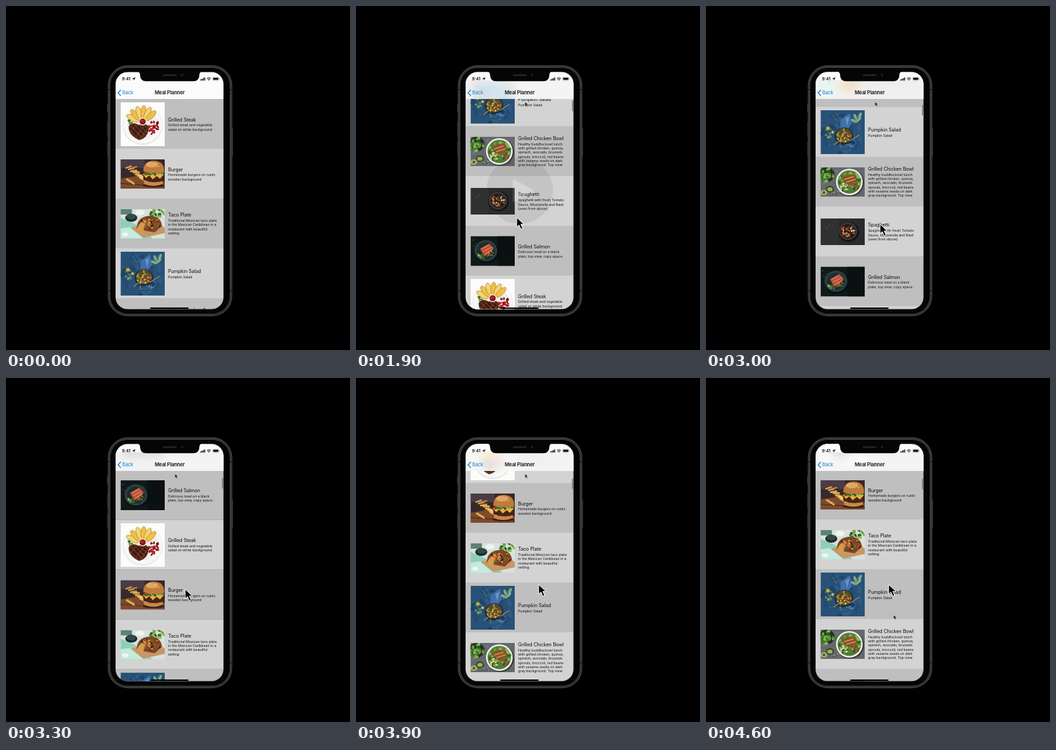
Animation, 518 px wide and 518 px high, one loop 4700 ms. Source, as an HTML page:

```html
<!DOCTYPE html>
<html lang="en">
<head>
<meta charset="utf-8">
<title>Meal Planner</title>
<style>
  html, body { margin: 0; width: 100%; height: 100%; overflow: hidden; background: #000; }
  svg { display: block; width: 100vw; height: 100vh; }
  text { font-family: Inter, "Open Sans", sans-serif; fill: #111; }
  .title { font-size: 7.3px; letter-spacing: -.12px; }
  .note { font-size: 5.2px; }
  .bar { font-size: 7.4px; letter-spacing: -.12px; }
</style>
</head>
<body>
<svg id="stage" viewBox="0 0 518 518"></svg>
<script>
const ROW = 75, LIST_TOP = 140, LOOP = 4700, STEP = 100;

// Drawing helpers
const rect = (x, y, w, h, fill, extra = '') =>
  `<rect x="${x}" y="${y}" width="${w}" height="${h}" fill="${fill}" ${extra}/>`;
const oval = (x, y, rx, ry, fill, extra = '') =>
  `<ellipse cx="${x}" cy="${y}" rx="${rx}" ry="${ry}" fill="${fill}" ${extra}/>`;
const path = (d, fill, extra = '') => `<path d="${d}" fill="${fill}" ${extra}/>`;
const line = (d, color, width) =>
  path(d, 'none', `stroke="${color}" stroke-width="${width}" stroke-linecap="round"`);

function bits(count, cx, cy, rx, ry, size, colors, seed) {
  const random = () => (seed = (seed * 16807) % 2147483647) / 2147483647;
  for (let i = 0; i < 5; i++) random();
  let out = '';
  for (let i = 0; i < count; i++) {
    const angle = random() * 2 * Math.PI, r = Math.sqrt(random());
    const x = cx + rx * r * Math.cos(angle), y = cy + ry * r * Math.sin(angle);
    out += oval(x.toFixed(1), y.toFixed(1), size * (.7 + random() * .6), size * .6,
      colors[i % colors.length],
      `transform="rotate(${Math.floor(random() * 180)} ${x.toFixed(1)} ${y.toFixed(1)})"`);
  }
  return out;
}

const greens = ['#3f7a2c', '#6ca63f', '#2c5823', '#8dbb55'];

function steakPhoto() {
  return rect(0, 0, 66, 66, '#fcfcfa') + oval(33, 34, 30, 30, '#e6e6e4') +
    oval(33, 33, 29, 29, '#f8f8f6') + oval(33, 33, 23, 23, '#efeeeb') +
    [-62, -40, -18, 4, 26, 46].map((a, i) =>
      oval(33, 15, 4, 10, i % 2 ? '#edc04a' : '#f2d474',
        `transform="rotate(${a} 33 32)" stroke="#b98022" stroke-width=".7"`)).join('') +
    bits(9, 12, 30, 5, 4, 1.8, greens, 4) +
    bits(38, 49, 38, 9, 10, 2, ['#a01820', '#c32b30', '#6b1015'], 7) +
    path('M12 37Q16 28 27 34Q42 29 42 41Q40 54 28 57Q12 50 12 37Z', '#5b2a1c') +
    line('M15 39L27 52M19 35L33 50M26 36L38 47M32 35L40 42', '#241009', 1.5) +
    line('M15 45L22 36M23 52L35 36M31 53L40 40', '#9a5a3c', .8) +
    oval(33, 29, 6, 6, '#f6e9e3') + oval(33, 29, 4.6, 4.6, '#8f1717') +
    oval(32, 28, 2, 1.5, '#b83526');
}

function burgerPhoto() {
  let fries = '';
  for (let i = 0; i < 15; i++) {
    const x = 8 + (i * 7) % 24, y = 13 + (i * 5) % 18;
    fries += line(`M${x} ${y}l${8 + i % 4} ${(i * 3) % 11 - 3}`,
      ['#e2ab52', '#f0c976', '#c6883a'][i % 3], 2);
  }
  return rect(0, 0, 66, 44, '#37282a') + rect(0, 0, 36, 13, '#4a3c45') +
    path('M0 29L30 24L66 34V44H0Z', '#7d4b2b') + line('M0 36L66 41', '#55301d', 1.4) +
    fries + oval(49, 39, 16, 3, '#3b1e12') +
    path('M35 32Q49 37 63 32V37Q49 43 35 37Z', '#c88a4a') +
    path('M34 24H65V32Q49 37 34 31Z', '#47241a') +
    path('M33 22L38 28L43 24L48 30L54 25L59 29L65 22Z', '#e8b23e') +
    bits(18, 49, 21, 16, 2.3, 2.2, [...greens, '#b52e24'], 9) +
    path('M34 18Q34 2 50 2Q66 3 65 19Q49 23 34 18Z', '#c07b3c') +
    oval(47, 8, 9, 4, '#dea764') + bits(14, 49, 8, 11, 4, .6, ['#f7e3b5'], 13);
}

function tacoPhoto() {
  return rect(0, 0, 66, 44, '#d8e1dc') + path('M0 13L21 22L48 44H0Z', '#8fcfb9') +
    path('M0 29L15 27L34 44H0Z', '#c4eadb') + rect(0, 0, 17, 8, '#5c8276') +
    oval(16, 13, 9, 6, '#19292b') + oval(16, 11.5, 7, 4, '#34494a') +
    oval(29, 5, 7, 4, '#eff4ef') + bits(16, 55, 6, 11, 6, 2.8, greens, 5) +
    path('M15 28L54 19L66 28V36L34 43Z', '#c79767') +
    path('M24 30Q24 12 42 10Q60 9 62 25L51 35Z', '#7b4525') +
    path('M24 30Q30 15 47 14Q34 21 34 37Z', '#d59c4d') +
    bits(40, 45, 22, 15, 9, 1.9, ['#4b2819', '#a94623', '#d8a04e', '#567b30', '#d3522f', '#2e1b13'], 21) +
    oval(7, 38, 5, 3, '#f2f5ef');
}

function pumpkinPhoto() {
  const leaf = (x, y, a) => oval(x, y, 5, 1.9, '#86ae86', `transform="rotate(${a} ${x} ${y})"`);
  return rect(0, 0, 66, 66, '#285178') +
    bits(35, 33, 33, 32, 32, 5, ['#234a70', '#2e5a83', '#204466'], 3) +
    path('M30 14L44 4L47 20L38 32L54 49L46 57L29 44Z', '#3f70a9') +
    path('M37 12L43 9L40 24Z', '#6793bf') + path('M39 37L53 49L46 54Z', '#183a63') +
    leaf(52, 10, 65) + leaf(57, 14, -45) + leaf(50, 16, 25) + leaf(59, 8, -65) +
    line('M49 20L58 4M18 7L24 16M8 27L17 42', '#75945e', .8) +
    bits(13, 12, 33, 5, 12, 1.8, ['#688d54', '#93ad5b', '#446f4e'], 6) +
    oval(11, 27, 2.5, 2.5, '#d2af38') + oval(18, 33, 2, 2, '#e0c053') +
    oval(35, 39, 14, 13, '#1d2e39') + oval(35, 38, 12, 11, '#544931') +
    bits(48, 35, 38, 11, 10, 1.8, ['#e5a72f', '#a7662b', '#7a9b38', '#e4bf55', '#385527', '#a44127'], 15) +
    line('M44 46L58 37M20 52L28 46', '#aa8b56', 1.2) +
    bits(14, 33, 56, 23, 7, .8, ['#d0a33c', '#9eb8ae'], 17);
}

function bowlPhoto() {
  return rect(0, 0, 66, 44, '#65696c') +
    bits(30, 33, 22, 32, 21, 4, ['#5a5e62', '#707477', '#62676b'], 8) +
    oval(9, 11, 12, 11, '#273225') + bits(34, 9, 11, 11, 10, 3, greens, 11) +
    oval(14, 33, 6, 5, '#314232') + oval(14, 33, 4, 3, '#9eb557') +
    oval(5, 38, 5, 4, '#a1b861') + oval(5, 38, 2, 2, '#6a4526') +
    oval(44, 23, 21, 20.5, '#34383b') + oval(43, 22, 20, 20, '#eeeeea') +
    oval(43, 22, 17.5, 17.5, '#597c38') + bits(55, 43, 22, 16, 16, 2.4, greens, 19) +
    bits(13, 35, 29, 6, 6, 1.7, ['#ddd9b2', '#e3bf75'], 20) +
    bits(14, 52, 28, 5, 6, 1.6, ['#8e2a25', '#bb4638'], 22) +
    path('M32 18Q39 7 52 12L55 19L42 27Z', '#8a502b') +
    line('M36 18L49 14M39 22L52 18', '#d19755', 1.7) +
    bits(9, 23, 38, 7, 4, .9, ['#d2c49a', '#33383a'], 25);
}

function spaghettiPhoto() {
  return rect(0, 0, 66, 40, '#292a2c') + rect(0, 0, 27, 40, '#333436', 'opacity=".6"') +
    oval(42, 20, 15.5, 15, '#101112') + oval(41, 19, 14, 13.5, '#3b3534') +
    oval(41, 19, 11, 10.5, '#221815') +
    bits(45, 41, 19, 9.5, 8.5, 1.7, ['#a72e20', '#d08f4c', '#d04a30', '#e9d9bd', '#526e30', '#6b2218'], 27) +
    bits(7, 11, 10, 9, 7, .6, ['#777066'], 29);
}

function salmonPhoto() {
  return rect(0, 0, 66, 45, '#111819') + rect(40, 0, 26, 45, '#0b1011') +
    oval(24, 24, 18, 17, '#07100f') + oval(23, 22, 17, 16, '#294042') +
    oval(23, 22, 13.5, 13, '#1d2c2d') + bits(15, 19, 29, 8, 4, 2, greens, 31) +
    path('M14 19L28 11L35 18L21 31Z', '#b84e38') +
    line('M17 19L27 14M19 23L31 17M22 27L33 20', '#e38b64', 1.2) +
    bits(10, 29, 26, 5, 4, 1.6, ['#bc2c2a', '#d58753', '#5e8439'], 33) +
    bits(5, 5, 10, 5, 6, 1.1, ['#344d39'], 35);
}

const meals = [
  ['Grilled Steak', steakPhoto, 66, 'Grilled steak and vegetable|salad on white background'],
  ['Burger', burgerPhoto, 44, 'Homemade burgers on rustic|wooden background'],
  ['Taco Plate', tacoPhoto, 44, 'Traditional Mexican taco plate|in the Mexican Caribbean in a|restaurant with beautiful|setting'],
  ['Pumpkin Salad', pumpkinPhoto, 66, 'Pumpkin Salad'],
  ['Grilled Chicken Bowl', bowlPhoto, 44, 'Healthy buddha bowl lunch|with grilled chicken, quinoa,|spinach, avocado, brussels|sprouts, broccoli, red beans|with sesame seeds on dark|gray background. Top view.'],
  ['Spaghetti', spaghettiPhoto, 40, 'Spaghetti with fresh Tomato|Sauce, Mozzarella and Basil|(seen from above)'],
  ['Grilled Salmon', salmonPhoto, 45, 'Delicious meal on a black|plate, top view, copy space.']
];

function mealRow(index) {
  const [title, , height, note] = meals[index % meals.length];
  const lines = note.split('|'), base = 39.8 - 3.15 * lines.length;
  return `<g transform="translate(0 ${index * ROW})">` +
    rect(160, 0, 172, ROW + .2, index % 2 ? '#d3d3d3' : '#bfbfbf') +
    `<use href="#photo${index % meals.length}" x="172.5" y="${38 - height / 2}"/>` +
    `<text class="title" x="244" y="${base}">${title}</text>` +
    lines.map((words, i) =>
      `<text class="note" x="244" y="${base + 7.9 + i * 6.28}">${words}</text>`).join('') + '</g>';
}

const photos = meals.map(([, draw, height], i) =>
  `<symbol id="photo${i}" width="66.5" height="${height}" viewBox="0 0 66 ${height}" preserveAspectRatio="none">${draw()}</symbol>`).join('');

const phone =
  rect(152.5, 147, 3, 13, '#4a4a4a', 'rx="1"') + rect(152.5, 174, 3, 23, '#333', 'rx="1"') +
  rect(152.5, 204, 3, 23, '#333', 'rx="1"') + rect(338.5, 183, 3, 44, '#444', 'rx="1"') +
  rect(154.5, 90.5, 185, 375.5, '#050505', 'rx="29" stroke="#3b3c3b" stroke-width="2.4"') +
  rect(156.5, 92.5, 181, 371.5, 'none', 'rx="27" stroke="#6a6b6a" stroke-width=".7"') +
  [[153.5, 125], [337, 125], [153.5, 428], [337, 428]].map(([x, y]) => rect(x, y, 3.5, 1.5, '#191919')).join('');

const statusBar =
  '<text x="174.5" y="112.2" font-size="6.5" font-weight="600">9:41</text>' +
  path('M195 107.2L192.7 112.3L192.2 109.9L189.8 109.5Z', '#111') +
  [0, 1, 2, 3].map(i => rect(292.5 + i * 2, 110.4 - i, 1.4, 1.8 + i, '#111', 'rx=".3"')).join('') +
  line('M302.7 108.9Q305.5 106.5 308.3 108.9M303.9 110.4Q305.5 109.1 307.1 110.4', '#111', 1) +
  oval(305.5, 111.6, .8, .7, '#111') +
  rect(311.3, 107.2, 9, 4.8, 'none', 'rx="1.3" stroke="#777" stroke-width=".5"') +
  rect(312, 107.9, 7.6, 3.4, '#111', 'rx=".7"') + rect(320.8, 108.8, .7, 1.6, '#777');

const arrow = 'M0 0V14.5L3.5 11.3L6.2 17.6L9 16.4L6.3 10.3H11Z';
const stage = document.getElementById('stage');

stage.innerHTML = `<defs>${photos}
  <clipPath id="screen"><rect x="165" y="99.5" width="162.5" height="357" rx="18"/></clipPath>
  <clipPath id="header"><rect x="165" y="112" width="163" height="28"/></clipPath>
  <filter id="frost" filterUnits="userSpaceOnUse" x="150" y="85" width="192" height="75">
    <feGaussianBlur stdDeviation="7"/><feColorMatrix type="saturate" values="1.8"/></filter></defs>
  <rect width="518" height="518"/>${phone}
  <g clip-path="url(#screen)">
    <g id="list">${Array.from({length: 28}, (_, i) => mealRow(i)).join('')}</g>
    ${rect(165, 99, 163, 41, '#fbfbfb')}
    <g id="tint" clip-path="url(#header)" opacity=".16"><g filter="url(#frost)"><use href="#list"/></g></g>
    ${statusBar}
    ${line('M172.6 126.7L168.8 130.7L172.6 134.7', '#1685d2', 1.3)}
    <text class="bar" x="175" y="133.4" style="fill:#1685d2">Back</text>
    <text class="bar" x="246.5" y="133.4" text-anchor="middle" font-weight="600">Meal Planner</text>
    <rect id="thumb" x="325.3" width="1.5" height="16" rx=".7" fill="#777"/>
    ${rect(217, 454, 58, 2, '#000', 'rx="1"')}
  </g>
  ${path('M198 98.5Q201.5 99.5 201.8 103Q202 113.3 211 113.3H282Q291 113.3 291.3 103Q291.5 99.5 295 98.5Z', '#050505')}
  ${rect(236, 102.7, 21, 2.8, '#232323', 'rx="1.4"')}${oval(265.3, 104, 2, 2, '#1c1c20')}
  <g id="play">${oval(0, 0, 43, 43, '#3a3a3a', 'opacity=".55"')}
    ${path('M-7.5 -13L16 0L-7.5 13Z', '#e4e4e4', 'stroke="#e4e4e4" stroke-width="3" stroke-linejoin="round"')}</g>
  ${path(arrow, '#111', 'id="touch" stroke="#ddd" stroke-width="1"')}
  ${path(arrow, '#000', 'id="pointer" stroke="#fff" stroke-width="1" stroke-linejoin="round"')}`;

// Keyed motion: each key is [time, value]
function segment(keys, t) {
  let i = 0;
  while (i < keys.length - 2 && t > keys[i + 1][0]) i++;
  const span = keys[i + 1][0] - keys[i][0];
  return [i, Math.min(1, Math.max(0, (t - keys[i][0]) / span)), span];
}

function linear(keys, t) {
  const [i, u] = segment(keys, t);
  return keys[i][1] + (keys[i + 1][1] - keys[i][1]) * u;
}

// Monotone cubic: the speed at a key is the harmonic mean of its neighbours
function smooth(keys, t) {
  const slope = i => keys[i + 1] && keys[i] ? (keys[i + 1][1] - keys[i][1]) / (keys[i + 1][0] - keys[i][0]) : 0;
  const speed = i => {
    const a = slope(i - 1), b = slope(i);
    return a * b > 0 ? 2 * a * b / (a + b) : 0;
  };
  const [i, u, span] = segment(keys, t), v = 1 - u;
  return keys[i][1] * v * v * (1 + 2 * u) + keys[i + 1][1] * u * u * (3 - 2 * u) +
    span * u * v * (speed(i) * v - speed(i + 1) * u);
}

const scrollKeys = [[1600, 0], [1700, 8], [1900, 259], [3000, 1263], [3500, 1593], [3900, 1632], [4600, 1652]];
const pointerX = [[400, 243], [500, 237.5], [1200, 237.5], [1900, 242], [3000, 262], [3500, 275]];
const pointerY = [[400, 318], [500, 312], [1200, 312], [1900, 318.5], [3000, 328.5], [3500, 311]];
const touchX = [[3900, 254.5], [4600, 282.5]];
const touchY = [[1600, 400], [1700, 392], [1900, 144.5], [3900, 144.5], [4600, 357]];

const part = id => document.getElementById(id);
const place = (id, x, y, scale = 1) =>
  part(id).setAttribute('transform', `translate(${x} ${y}) scale(${scale})`);
const show = (id, visible) => part(id).setAttribute('visibility', visible ? 'visible' : 'hidden');

function render(now) {
  const t = Math.floor(now % LOOP / STEP) * STEP;
  const scroll = smooth(scrollKeys, t);
  place('list', 0, LIST_TOP - scroll);
  show('tint', t >= 1800);
  part('thumb').setAttribute('y', 140.7 + scroll * .0066);
  show('thumb', t >= 1700);

  const fade = Math.min(1, Math.max(0, (t - 1400) / 600));
  place('play', 246.5, 278, 1 + fade * .2);
  part('play').setAttribute('opacity', 1 - fade);
  show('play', t >= 100 && fade < 1);

  place('pointer', linear(pointerX, t), linear(pointerY, t));
  show('pointer', t >= 400);
  place('touch', linear(touchX, t), linear(touchY, t), .4);
  show('touch', t >= 1600);
  requestAnimationFrame(render);
}
requestAnimationFrame(render);
</script>
</body>
</html>
```
